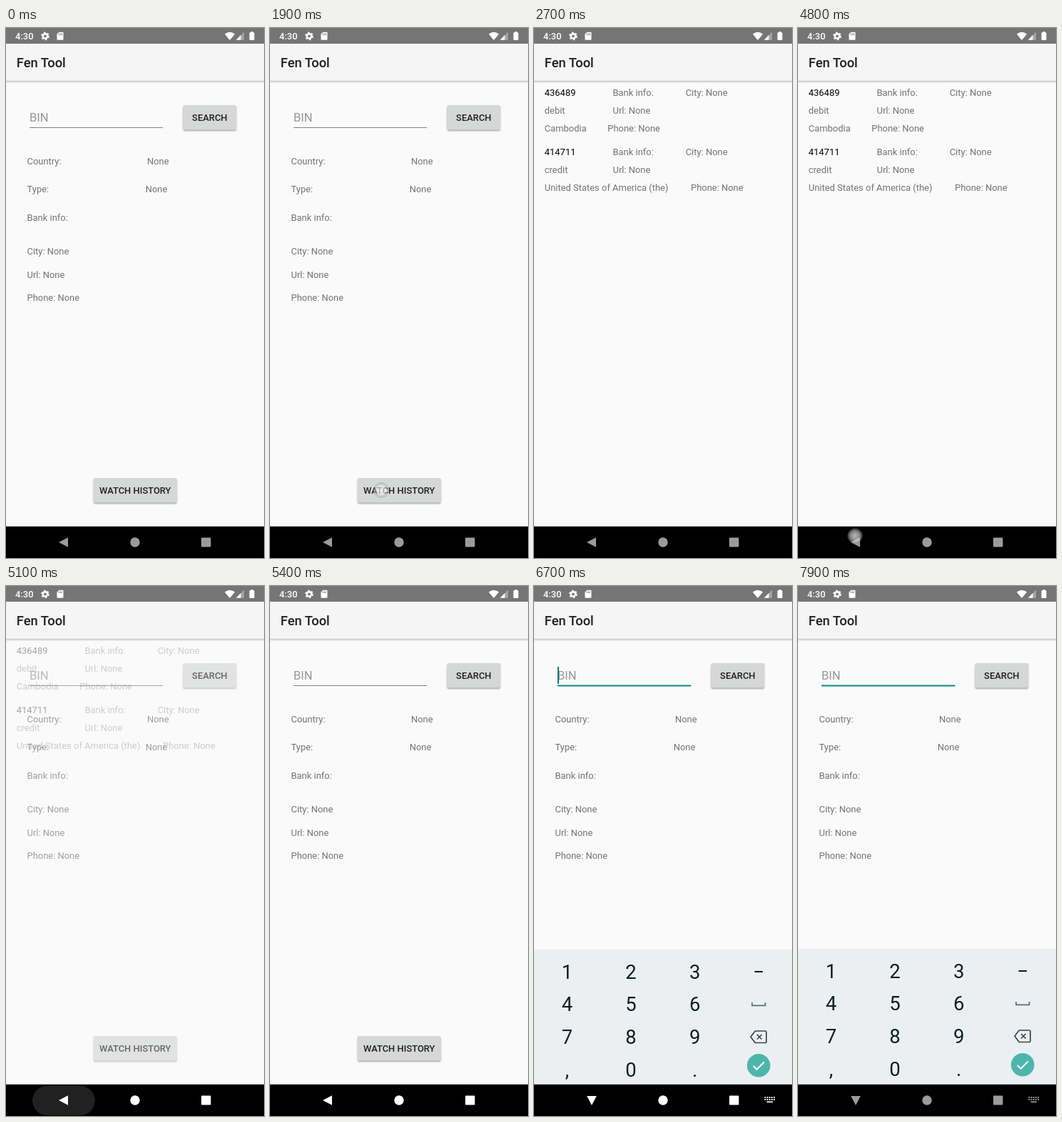
An HTML page that plays this animation: 362 by 742 pixels, repeating every 8 s.

```html
<!DOCTYPE html>
<html lang="en">
<head>
<meta charset="utf-8">
<title>Card lookup</title>
<style>
html, body { margin: 0; width: 100%; height: 100%; overflow: hidden; background: #fafafa; }
svg { display: block; width: 100%; height: 100%; }
text { font-family: Roboto, sans-serif; font-size: 12.95px; fill: #737373; }
.title { font-size: 18.4px; font-weight: 500; fill: #212121; }
.btn { font-weight: 500; fill: #202020; text-anchor: middle; }
.clock { font-weight: 500; fill: #fff; }
.hint { font-size: 16.6px; fill: #999; }
.num { fill: #000; }
.key { font-size: 27.5px; fill: #0c1f27; text-anchor: middle; }
</style>
</head>
<body>
<svg viewBox="0 0 362 742">
  <defs>
    <radialGradient id="spot">
      <stop offset="0" stop-color="#fff" stop-opacity=".9"/>
      <stop offset=".55" stop-color="#eee" stop-opacity=".75"/>
      <stop offset=".85" stop-color="#bbb" stop-opacity=".6"/>
      <stop offset="1" stop-color="#888" stop-opacity=".25"/>
    </radialGradient>
    <linearGradient id="shade" x2="0" y2="1">
      <stop offset="0" stop-color="#000" stop-opacity=".24"/>
      <stop offset="1" stop-color="#000" stop-opacity="0"/>
    </linearGradient>
    <filter id="soft" x="-10%" y="-30%" width="120%" height="170%"><feGaussianBlur stdDeviation="1.1"/></filter>
    <clipPath id="btnClip"><rect x="123" y="630" width="116.5" height="34.5" rx="2"/></clipPath>
  </defs>

  <rect width="362" height="742" fill="#fafafa"/>
  <g id="main"></g>
  <g id="list"></g>

  <rect y="73.5" width="362" height="4" fill="url(#shade)"/>
  <rect y="22" width="362" height="51.6" fill="#f5f5f5"/>
  <text class="title" x="14.8" y="55.3">Fen Tool</text>

  <rect width="362" height="22" fill="#757575"/>
  <text class="clock" x="13" y="16">4:30</text>
  <g fill="#fff">
    <circle cx="55" cy="11.3" r="3.2" fill="none" stroke="#fff" stroke-width="2.6"/>
    <circle cx="55" cy="11.3" r="4.9" fill="none" stroke="#fff" stroke-width="2" stroke-dasharray="2.57 2.57"/>
    <path d="M74.3 5.8h5.2q1 0 1 1v9q0 1-1 1h-7q-1 0-1-1v-7z"/>
    <path d="M74.4 7.5v2.4M76.4 7.5v2.4M78.4 7.5v2.4" stroke="#757575"/>
    <path d="M306.8 8.5Q314 3 321.2 8.5L314 17z"/>
    <path d="M334 5.5V16.7H322.8z" opacity=".35"/>
    <path d="M329.5 10V16.7H322.8z"/>
    <path d="M343.5 5h3v1.3h1.2q.8 0 .8.8v9q0 .8-.8.8h-5.4q-.8 0-.8-.8v-9q0-.8.8-.8h1.2z"/>
  </g>

  <g id="keys"></g>

  <rect y="697.8" width="362" height="44.2"/>
  <rect id="navRipple" x="37" y="700" width="88" height="41" rx="20.5" fill="#fff"/>
  <g id="nav">
    <path id="back" d="M74 720L87 713.2V726.8z"/>
    <circle cx="181" cy="720" r="6.7"/>
    <rect x="274" y="713.4" width="13.4" height="13.2" rx="1"/>
    <g id="imeIcon">
      <path d="M323.5 716h14.5M323.5 719h14.5" stroke-width="1.8" stroke-dasharray="1.8 1.35"/>
      <path d="M326.5 722.3h8.5" stroke-width="1.7"/>
    </g>
  </g>
  <circle id="touch" r="10.5" fill="url(#spot)" stroke="#777" stroke-opacity=".35" stroke-width=".8"/>
</svg>
<script>
const LOOP = 8000, STEP = 100;
const $ = id => document.getElementById(id);
const clamp = v => Math.max(0, Math.min(1, v));
const ramp = (t, a, b) => clamp((t - a) / (b - a));
const within = (t, a, b) => t >= a && t < b;
const fade = (el, v) => el.setAttribute('opacity', v);

const label = ([x, y, s, cls = '']) => `<text class="${cls}" x="${x}" y="${y}">${s}</text>`;
const button = (id, x, y, w, s) => `
  <rect id="${id}Shadow" x="${x}" y="${y + 1.5}" width="${w}" height="34.5" rx="2" fill="#000" opacity=".34" filter="url(#soft)"/>
  <rect x="${x}" y="${y}" width="${w}" height="34.5" rx="2" fill="#d6d7d7"/>
  <g id="${id}Ripple"></g>` + label([x + w / 2, y + 21.8, s, 'btn']);

$('main').innerHTML = [
  [33, 131.4, 'BIN', 'hint'],
  [29.5, 190.6, 'Country:'], [198, 190.6, 'None'],
  [29.5, 230.4, 'Type:'], [195.7, 230.4, 'None'],
  [29.5, 270, 'Bank info:'],
  [29.5, 317.4, 'City: None'],
  [29.5, 349.8, 'Url: None'],
  [29.5, 382, 'Phone: None']
].map(label).join('') +
  '<rect id="line" x="33" width="187.3"/>' +
  '<rect id="cursor" x="33" y="113" width="1.9" height="24" fill="#00796b"/>' +
  button('search', 248.6, 108, 74.4, 'SEARCH') +
  button('watch', 123, 630, 116.5, 'WATCH HISTORY');

$('watchRipple').innerHTML = `<g clip-path="url(#btnClip)">
  <rect x="123" y="630" width="117" height="35" opacity=".5"/>
  <circle id="wave" cx="156" cy="647" opacity=".5"/></g>`;

const record = (y, bin, type, country, phoneX) => [
  [14.8, y, bin, 'num'], [110.5, y, 'Bank info:'], [212.7, y, 'City: None'],
  [14.8, y + 25, type], [110.5, y + 25, 'Url: None'],
  [14.8, y + 50, country], [phoneX, y + 50, 'Phone: None']
];
$('list').innerHTML = [
  ...record(95, '436489', 'debit', 'Cambodia', 103.3),
  ...record(177.8, '414711', 'credit', 'United States of America (the)', 220)
].map(label).join('');

const rows = ['123', '456', '789', ',0.'];
$('keys').innerHTML = '<rect y="508" width="362" height="220" fill="#eceff1"/>' +
  rows.map((row, r) => [...row].map((c, i) =>
    label([46.5 + i * 89.6, 548.6 + r * 45.8, c, 'key'])).join('')).join('') + `
  <g fill="none" stroke="#37474f" stroke-width="1.7">
    <path d="M309.5 539h11.5" stroke="#0c1f27" stroke-width="2.1"/>
    <path d="M306 582v4.3h18.5V582" stroke="#546e7a"/>
    <path d="M310.3 622h14q1.7 0 1.7 1.7v13.1q0 1.7-1.7 1.7h-14L304 630.3z" stroke-linejoin="round"/>
    <path d="M313 627l6.5 6.5M319.5 627l-6.5 6.5"/>
  </g>
  <circle cx="315.2" cy="670.3" r="16.3" fill="#4db6ac"/>
  <path d="M307.8 671l4.8 4.8L323 665.4" fill="none" stroke="#fff" stroke-width="2"/>`;

const taps = [
  { x: 156, y: 647, from: 1900, to: 2100 },
  { x: 80, y: 711, from: 4800, to: 5000 },
  { x: 110, y: 126, from: 6300, to: 6400 }
];

function draw(ms) {
  const t = Math.floor(ms / STEP) * STEP;

  // Screens
  const listIn = ramp(t, 2500, 2700), swap = ramp(t, 4900, 5200);
  fade($('main'), t < 2400 ? 1 : swap);
  fade($('list'), listIn * (1 - swap));

  // Pressed button
  const pressed = within(t, 2000, 2400);
  fade($('watchRipple'), pressed ? .14 : 0);
  $('wave').setAttribute('r', 100 * ramp(t, 1900, 2200));
  $('watchShadow').setAttribute('y', pressed ? 634 : 631.5);

  // Input field
  const focused = t >= 6400;
  const line = $('line');
  line.setAttribute('y', focused ? 138.6 : 139);
  line.setAttribute('height', focused ? 1.9 : 1);
  line.setAttribute('fill', focused ? '#008577' : '#808080');
  fade($('cursor'), focused && Math.floor((t - 6400) / 500) % 2 === 0 ? 1 : 0);

  // Keyboard: short decelerating rise with a fade
  const rise = ramp(t, 6400, 6850);
  $('keys').setAttribute('transform', `translate(0 ${19 * Math.pow(1 - rise, 2.7)})`);
  fade($('keys'), ramp(t, 6400, 6650));

  // Navigation bar
  const light = ramp(t, 4800, 5100) * (1 - ramp(t, 7300, 7900));
  const tone = Math.round(155 + 100 * light);
  const color = `rgb(${tone},${tone},${tone})`;
  $('nav').setAttribute('fill', color);
  $('nav').setAttribute('stroke-width', 0);
  $('imeIcon').setAttribute('stroke', color);
  const turn = ramp(t, 6300, 6600);
  $('back').setAttribute('transform', `rotate(${-90 * turn} 81 720)`);
  fade($('imeIcon'), turn);
  fade($('navRipple'), within(t, 4900, 5400) ? .2 * (1 - ramp(t, 5000, 5200) * .7) : 0);

  // Finger
  const tap = taps.find(p => within(t, p.from, p.to));
  fade($('touch'), tap ? .8 : 0);
  if (tap) $('touch').setAttribute('transform', `translate(${tap.x} ${tap.y})`);
}

const start = performance.now();
function tick() {
  draw((performance.now() - start) % LOOP);
  requestAnimationFrame(tick);
}
tick();
</script>
</body>
</html>
```
